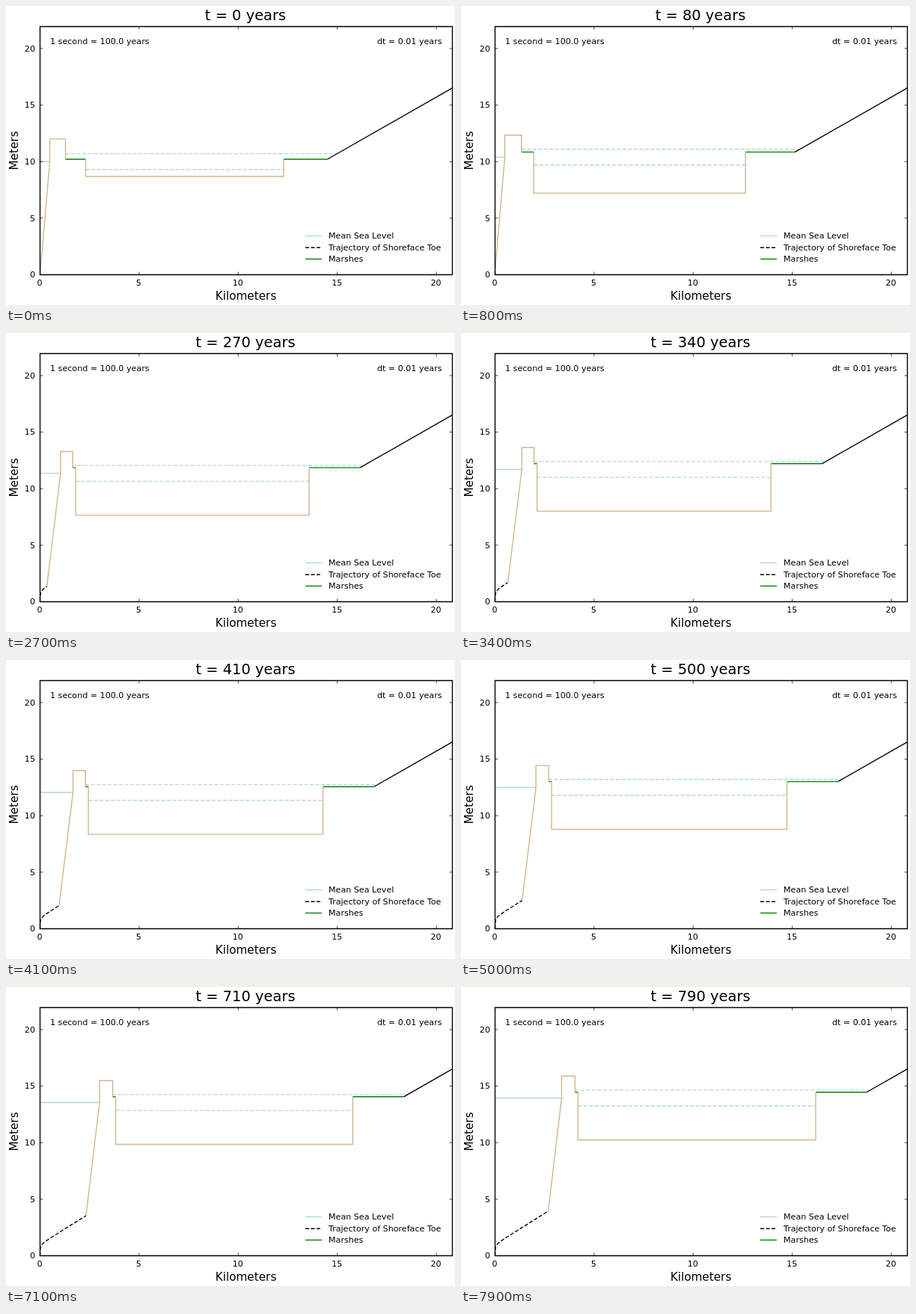
Animation, 600 px wide and 400 px high, one loop 8 s. Source, as an HTML page:

```html
<!DOCTYPE html>
<html lang="en">
<head>
<meta charset="utf-8">
<title>Barrier island evolution</title>
<style>
  html, body { margin: 0; width: 100%; height: 100%; overflow: hidden; background: #fff; }
  svg { display: block; font: 11.11px "DejaVu Sans", sans-serif; }
  path { fill: none; stroke-width: 1.39; }
  .mid { text-anchor: middle; }
  .end { text-anchor: end; }
  .title { font-size: 19.44px; }
  .axis { font-size: 15.28px; }
  .sea { stroke: #add8e6; }
  .sand { stroke: #d2b48c; }
  .marsh { stroke: #008000; }
  .land { stroke: #000; }
  .dash { stroke-dasharray: 5 2.5; }
  .tick { stroke: #000; stroke-width: .7; }
</style>
</head>
<body>
<svg width="600" height="400" viewBox="0 0 600 400">
  <g transform="translate(.5 .5)">
    <path id="sea" class="sea"/>
    <path id="high" class="sea dash"/>
    <path id="low" class="sea dash"/>
    <path id="track" class="land dash"/>
    <path id="marsh" class="marsh"/>
    <path id="sand" class="sand"/>
    <path id="land" class="land"/>
    <path id="ticks" class="tick"/>
    <path class="land" d="M45 27H596V359H45Z"/>
  </g>
  <g id="labels"></g>

  <text id="title" class="mid title" x="320" y="19"></text>
  <text class="mid axis" x="320.5" y="393">Kilometers</text>
  <text class="mid axis" transform="translate(16 193.5) rotate(-90)">Meters</text>
  <text x="59" y="51">1 second = 100.0 years</text>
  <text class="end" x="582.5" y="51">dt = 0.01 years</text>

  <path class="sea" d="M400 307.5H422"/>
  <path class="land dash" d="M400 323.3H422"/>
  <path class="marsh" d="M400 338.5H422"/>
  <text x="431" y="311">Mean Sea Level</text>
  <text x="431" y="327">Trajectory of Shoreface Toe</text>
  <text x="431" y="342">Marshes</text>
</svg>
<script>
const $ = id => document.getElementById(id);
const draw = (id, d) => $(id).setAttribute('d', d);
const px = km => 45 + km * 26.48;
const py = m => 359 - m * 15.13;

// Axis ticks on all four sides, labels on the left and bottom
let ticks = '', labels = '';
for (let v = 0; v <= 20; v += 5) {
  const x = px(v), y = py(v);
  if (v) ticks += `M${x} 359v-4M${x} 27v4M45 ${y}h4M596 ${y}h-4`;
  labels += `<text class="mid" x="${x}" y="374">${v}</text>` +
            `<text class="end" x="39" y="${y + 4.2}">${v}</text>`;
}
draw('ticks', ticks);
$('labels').innerHTML = labels;

// A slow creep that turns into a steady landward speed around the onset
const glide = (start, creep, speed, onset, blend) => s =>
  start + creep * s + (speed - creep) * blend * Math.log1p(Math.exp((s - onset) / blend));

const toe = glide(45, 0, 12, 1.98, .33);
const shore = glide(58, 0, 11.84, 1.48, .15);
const back = glide(79, 1.7, 12.15, 2.22, .1);

// Where the mainland slope reaches height y
const coast = y => 429 + (204.5 - y) / .5705;

function render(s) {
  const years = Math.round(s * 100), rise = years * .005;
  const settle = Math.exp(-s / .52);
  const sea = py(10 + rise);
  const top = sea - 29.2 - 1.1 * settle;
  const marsh = sea - 7.7 + 4.5 * settle;
  const floor = sea + 56 - 36.2 * settle;
  const high = sea - 10.6, low = sea + 10.6;
  const toeX = toe(s), shoreX = shore(s), backX = back(s);
  const bayEnd = 368.7 + 13.27 * s + 1.8 * settle;
  // Both bay edges erode alike until only a sliver of back marsh is left
  const bayStart = Math.max(backX + 4, 106 - (bayEnd - 370.5));
  const coastX = coast(marsh);

  $('title').textContent = `t = ${years} years`;
  draw('sea', `M45 ${sea}H${shoreX}`);
  draw('high', `M${backX} ${high}H${coast(high)}`);
  draw('low', `M${bayStart} ${low}H${bayEnd}`);
  draw('marsh', `M${backX} ${marsh}H${bayStart}M${bayEnd} ${marsh}H${coastX}`);
  draw('sand', `M${toeX} ${py(rise)}L${shoreX} ${sea}V${top}H${backX}V${marsh}` +
               `M${bayStart} ${marsh}V${floor}H${bayEnd}V${marsh}`);
  draw('land', `M${coastX} ${marsh}L596 109.2`);

  let track = 'M45 359';
  for (let k = 1; k <= years / 10; k++) track += `L${toe(k / 10)} ${py(k * .05)}`;
  draw('track', track);
}

function loop(now) {
  render(Math.floor(now % 8000 / 100) / 10);
  requestAnimationFrame(loop);
}
render(0);
requestAnimationFrame(loop);
</script>
</body>
</html>
```
